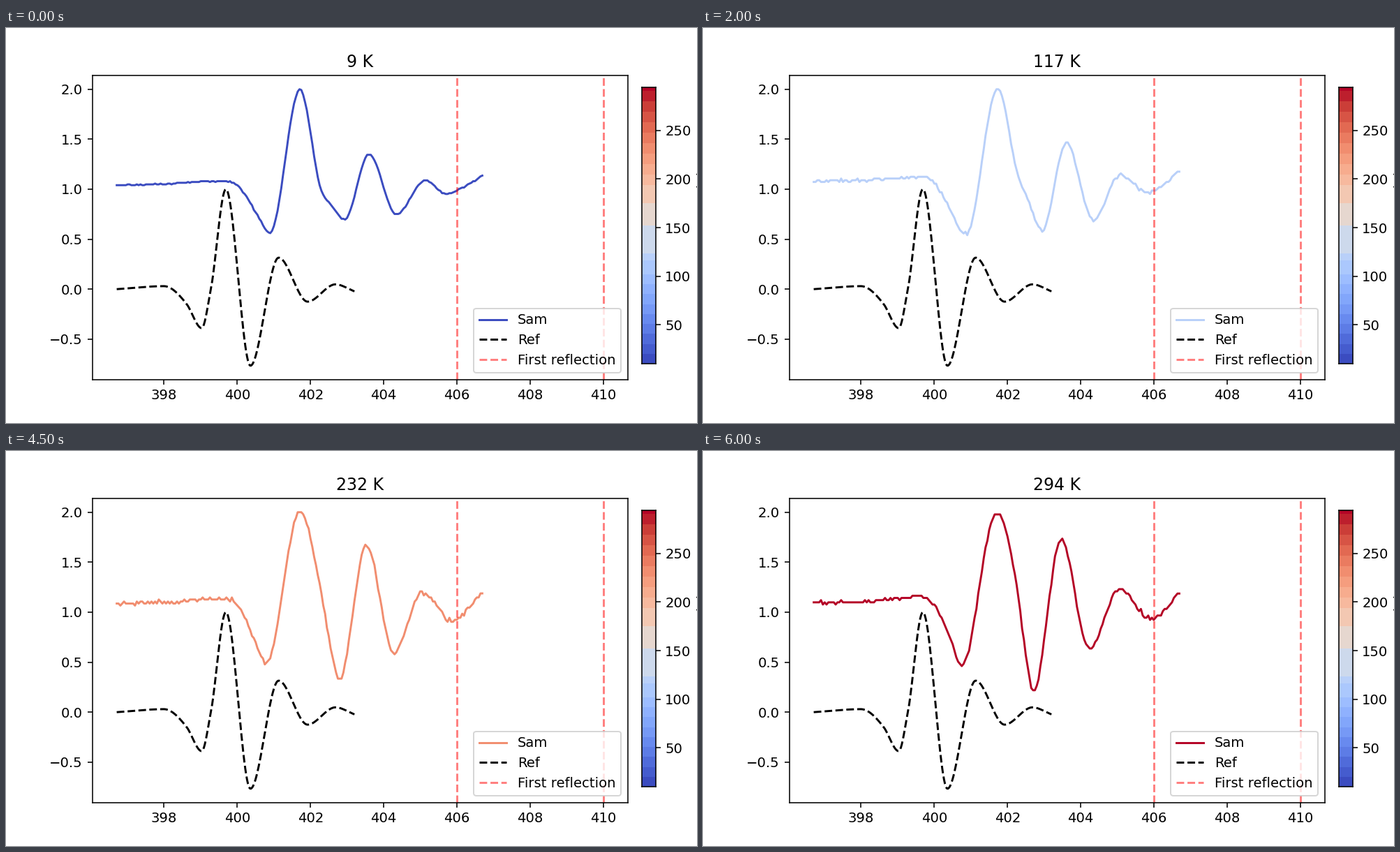
These frames come from a looping animation (990x566 px, 6.5 s). A matplotlib script:

```python
import numpy as np
import matplotlib.pyplot as plt
from matplotlib.animation import FuncAnimation

DPI = 141.43
W, H = 990, 566
T_MIN, T_MAX = 9.9, 294.5
X_MIN, X_REF_END, X_SAM_END = 396.71, 403.2, 406.69
TEMPS = [9, 18, 55, 88] + [int(117 + 24.6 * k - 0.3 * k * k) for k in range(9)]

# Temperatures at which a knot's values are given, short or long form
KEY_TEMPS = {3: [9, 18, 294], 6: [9, 18, 117, 210, 253, 294]}

# Each knot of the sample pulse: x and y, constant or varying with temperature
SAM_KNOTS = [
    (X_MIN, [1.04, 1.07, 1.095]),
    (398, [1.052, 1.08, 1.105]),
    (399.5, [1.08, 1.105, 1.145]),
    (400, [1.035, 1.06, 1.075]),
    (400.2, 0.955),
    (400.5, [0.77, 0.79, 0.67]),
    ([400.9, 400.94, 400.75], [0.565, 0.595, 0.46]),
    ([401.71, 401.75, 401.7], 2),
    (402.3, [0.98, 1.13, 1.12, 1.2, 1.16, 1.14]),
    (402.55, [0.845, 0.905, 0.9, 0.78, 0.52, 0.44]),
    ([402.93, 402.99, 402.95, 402.83, 402.74, 402.71],
     [0.7, 0.68, 0.58, 0.39, 0.265, 0.21]),
    ([403.6, 403.64, 403.6, 403.56, 403.5, 403.46],
     [1.35, 1.35, 1.47, 1.64, 1.695, 1.73]),
    ([404.34, 404.4, 404.24], [0.75, 0.785, 0.69, 0.59, 0.585, 0.63]),
    ([405.13, 405.08, 405.03], [1.085, 1.095, 1.225]),
    ([405.71, 405.75, 405.95], [0.955, 1, 0.965, 0.92, 0.905, 0.93]),
    (406.2, [1.025, 1.055, 0.98]),
    (X_SAM_END, [1.135, 1.175, 1.21]),
]

REF_KNOTS = [
    (X_MIN, 0), (398, 0.03), (398.62, -0.15), (399.03, -0.39), (399.28, 0),
    (399.69, 1), (400.36, -0.766), (401.13, 0.315), (401.92, -0.125),
    (402.68, 0.048), (X_REF_END, -0.022),
]

# Edges of the colour bar's bands, from foot to top
BANDS = np.r_[np.linspace(0, 128, 10), 148, 158, 198, 230,
              np.linspace(256, 391, 10), 396] / 396


def smooth(x, knots):
    """Cubic Hermite curve through the knots, level at every extremum."""
    kx, ky = np.array(knots, float).T
    slope = np.gradient(ky, kx)
    step = np.diff(ky)
    slope[1:-1][step[:-1] * step[1:] <= 0] = 0
    i = np.clip(np.searchsorted(kx, x) - 1, 0, len(kx) - 2)
    h = kx[i + 1] - kx[i]
    t = (x - kx[i]) / h
    ease = t * t * (3 - 2 * t)
    return (ky[i] * (1 - ease) + ky[i + 1] * ease
            + h * t * (1 - t) * (slope[i] * (1 - t) - slope[i + 1] * t))


def at_temp(value, temp):
    if isinstance(value, list):
        return np.interp(temp, KEY_TEMPS[len(value)], value)
    return value


def sample_pulse(i):
    temp = TEMPS[i]
    y = smooth(sam_x, [(at_temp(kx, temp), at_temp(ky, temp))
                       for kx, ky in SAM_KNOTS])
    # Coarse digitiser steps, finer for the strong cold signal
    grain = 0.008 if i == 0 else 0.014 + 0.008 * temp / T_MAX
    noise = np.random.default_rng(i).normal(0, 0.45 * grain, len(y))
    return np.minimum(2 - np.round((2 - y - noise) / grain) * grain, 2)


def temp_color(temp):
    return plt.cm.coolwarm(max(0.0, (temp - T_MIN) / (T_MAX - T_MIN)))


fig = plt.figure(figsize=((W + 0.01) / DPI, (H + 0.01) / DPI), dpi=DPI)
ax = fig.add_subplot()
sam_x = np.linspace(X_MIN, X_SAM_END, 201)
ref_x = np.linspace(X_MIN, X_REF_END, 260)

sam, = ax.plot(sam_x, sample_pulse(0), color=temp_color(TEMPS[0]), label="Sam")
ax.plot(ref_x, smooth(ref_x, REF_KNOTS), "k--", label="Ref")
ax.axvline(406, color="red", ls="--", alpha=0.5, label="First reflection")
ax.axvline(410, color="red", ls="--", alpha=0.5)
ax.set_xlim(396.0455, 410.6645)
ax.set_ylim(-0.9043, 2.1383)
title = ax.set_title("")
legend = ax.legend(loc="lower right")
sam_key = legend.get_lines()[0]

bar = fig.add_axes([0.92, 0.15, 0.02, 0.7])
middles = (BANDS[:-1] + BANDS[1:]) / 2
bar.pcolormesh([0, 1], T_MIN + BANDS * (T_MAX - T_MIN), middles[:, None],
               cmap="coolwarm", vmin=middles[0], vmax=middles[-1])
bar.set_xticks([])
bar.set_yticks(range(50, 251, 50))
bar.yaxis.tick_right()
bar.yaxis.set_label_position("right")
bar.set_ylabel("Temperature (K)")


def update(i):
    color = temp_color(TEMPS[i])
    sam.set_ydata(sample_pulse(i))
    sam.set_color(color)
    sam_key.set_color(color)
    title.set_text(f"{TEMPS[i]} K")
    return sam, sam_key, title


anim = FuncAnimation(fig, update, frames=len(TEMPS), interval=500, repeat=True)
plt.show()
```
